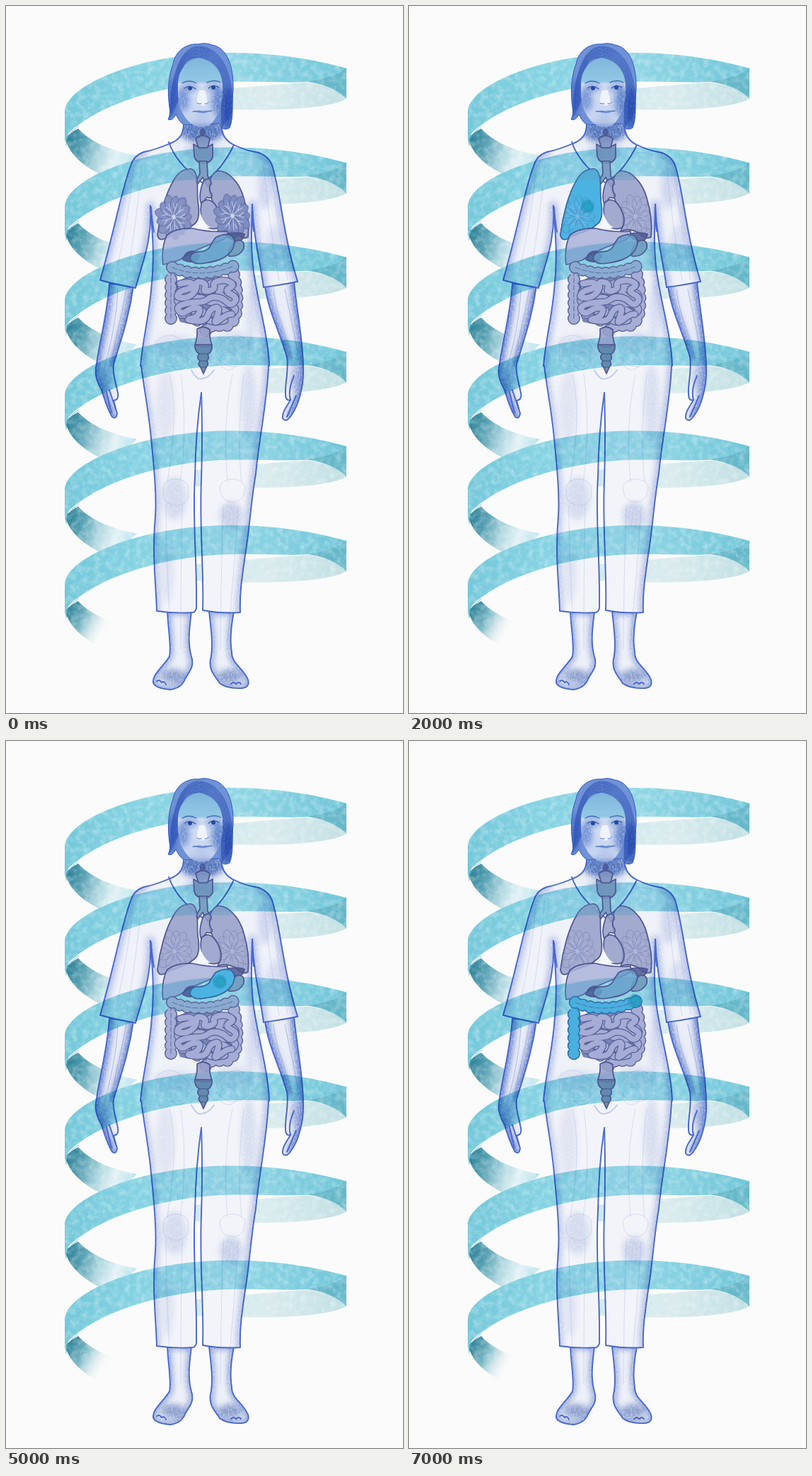
An HTML page that plays this animation: 561x998 px, repeating every 8 s.

```html
<!DOCTYPE html>
<html lang="en">
<head>
<meta charset="utf-8">
<title>Body and helix</title>
<style>
  html, body { margin: 0; height: 100%; overflow: hidden; background: #fbfbfb; }
  svg { display: block; width: 100vw; height: 100vh; }
  path, ellipse { stroke-linecap: round; stroke-linejoin: round; }
  .ink { fill: none; stroke: #4a69d3; stroke-width: 1.9; }
  .thin { fill: none; stroke: #7f98dc; stroke-width: .8; opacity: .32; }
  .organ { fill: #949cc8; fill-opacity: .84; stroke: #4d5690; stroke-width: 1.7; }
  .lit { fill: #4bb3e2; stroke: #2f689f; stroke-width: 1.4; }
  .multiply { mix-blend-mode: multiply; }
</style>
</head>
<body>
<svg id="stage" viewBox="0 0 561 998" preserveAspectRatio="none">
  <defs>
    <linearGradient id="front" gradientUnits="userSpaceOnUse" x1="83" x2="481" y1="0" y2="0">
      <stop offset="0" stop-color="#74c8da"/><stop offset=".25" stop-color="#83d2e2"/>
      <stop offset=".6" stop-color="#90d6e5"/><stop offset="1" stop-color="#70c6d9"/>
    </linearGradient>
    <linearGradient id="inside" gradientUnits="userSpaceOnUse" x1="86" x2="182" y1="190" y2="222">
      <stop offset="0" stop-color="#2f8299"/><stop offset=".2" stop-color="#519db0"/>
      <stop offset=".5" stop-color="#b3d9e1"/><stop offset=".72" stop-color="#e3f2f6"/>
      <stop offset="1" stop-color="#b5e2ec"/>
    </linearGradient>
    <linearGradient id="insideEnd" gradientUnits="userSpaceOnUse" x1="86" x2="140" y1="190" y2="220">
      <stop offset="0" stop-color="#2f8299"/><stop offset=".4" stop-color="#7db9c6"/>
      <stop offset="1" stop-color="#fbfbfb" stop-opacity="0"/>
    </linearGradient>
    <linearGradient id="back" gradientUnits="userSpaceOnUse" x1="260" x2="481" y1="0" y2="0">
      <stop offset="0" stop-color="#cfe8ee"/><stop offset=".5" stop-color="#d9ebed"/>
      <stop offset="1" stop-color="#c0dfe3"/>
    </linearGradient>
    <linearGradient id="skin" gradientUnits="userSpaceOnUse" x1="0" x2="0" y1="74" y2="172">
      <stop offset="0" stop-color="#7fb6dc"/><stop offset=".33" stop-color="#93c8e4"/>
      <stop offset=".37" stop-color="#d5e0f4"/><stop offset="1" stop-color="#c3d1ef"/>
    </linearGradient>
    <filter id="paper" color-interpolation-filters="sRGB">
      <feTurbulence type="fractalNoise" baseFrequency=".12" numOctaves="4" seed="4"/>
      <feColorMatrix values="0 0 0 0 1  0 0 0 0 1  0 0 0 0 1  0 0 0 .7 -.27"/>
      <feComposite operator="in" in2="SourceGraphic" result="n"/>
      <feMerge><feMergeNode in="SourceGraphic"/><feMergeNode in="n"/></feMerge>
    </filter>
    <filter id="pencil" x="-50%" y="-50%" width="200%" height="200%" color-interpolation-filters="sRGB">
      <feGaussianBlur stdDeviation="4.5" result="b"/>
      <feTurbulence type="fractalNoise" baseFrequency=".5 .3" numOctaves="2" seed="9"/>
      <feColorMatrix values="0 0 0 0 0  0 0 0 0 0  0 0 0 0 0  0 0 0 1.3 .25" result="n"/>
      <feComposite in="b" in2="n" operator="in"/>
    </filter>
  </defs>
</svg>
<script>
const stage = document.getElementById('stage');
let clips = 0;

const path = (d, attrs = '') => `<path d="${d}" ${attrs}/>`;
const group = (attrs, ...items) => `<g ${attrs}>${items.join('')}</g>`;
const ink = (d, attrs = '') => path(d, `class="ink" ${attrs}`);
const organ = (d, fill) => path(d, `class="organ" ${fill ? `style="fill:${fill}"` : ''}`);
const clipped = (d, ...items) => {
  const id = 'c' + clips++;
  return `<clipPath id="${id}">${path(d)}</clipPath>` + group(`clip-path="url(#${id})"`, ...items);
};
const smudge = (x, y, rx, ry, color, opacity) =>
  `<ellipse cx="${x}" cy="${y}" rx="${rx}" ry="${ry}" fill="${color}" opacity="${opacity}" filter="url(#pencil)"/>`;
const repeat = (n, make) => Array.from({ length: n }, (_, i) => make(i)).join('');

// Tinted shape with pencil shading along an edge, kept inside the shape.
const shaded = (d, tint, shade, width, opacity, edge = d) =>
  path(d, `fill="${tint}"`) +
  clipped(d, path(edge, `fill="none" stroke="${shade}" stroke-width="${width}" opacity="${opacity}" filter="url(#pencil)"`));

// Parts that show only during the given seconds of the loop.
const during = (seconds, ...items) => group(`data-on="${seconds}"`, ...items);
const lit = d => path(d, 'class="lit"');
const spot = (x, y, r) =>
  `<circle cx="${x}" cy="${y}" r="${r}" fill="#168fb4" opacity=".45"/>` +
  `<circle cx="${x + 1}" cy="${y}" r="${r * .62}" fill="#25a3c1" stroke="#147fa9" stroke-width=".7" opacity=".7"/>`;

function smooth(p) {
  let d = `M${p[0]},${p[1]}`;
  for (let i = 2; i < p.length - 2; i += 2)
    d += ` Q${p[i]},${p[i + 1]} ${(p[i] + p[i + 2]) / 2},${(p[i + 1] + p[i + 3]) / 2}`;
  return d;
}

const body = {
  armL: 'M146,392 C144,430 132,475 128,505 C124,522 130,532 135,542 C139,555 145,572 150,580 Q156,584 157,575 L152,557 Q160,556 158,546 C155,530 150,519 152,506 C162,472 174,440 180,395Z',
  armR: 'M366,395 C370,430 388,462 397,496 C400,515 394,532 395,548 Q395,558 402,556 C397,565 390,573 391,582 Q396,589 403,578 C413,565 421,538 420,510 C420,475 411,430 407,390Z',
  footL: 'M228,854 C229,880 234,904 231,918 C225,930 207,942 208,955 Q210,963 232,965 Q248,963 253,950 C258,940 265,936 263,922 C256,900 259,880 262,855Z',
  footR: 'M287,855 C290,880 293,905 289,922 C286,938 296,946 302,956 Q312,964 333,963 Q345,962 342,951 C336,935 318,928 319,912 C316,895 318,875 322,855Z',
  neck: 'M250,155 C251,183 247,190 232,194 L278,250 L322,196 Q306,192 304,155Z',
  shirt: 'M232,194 Q211,203 195,206 Q180,211 176,226 C163,260 152,322 133,387 Q155,393 183,398 C193,362 207,330 205,282 C206,315 211,350 205,402 C201,444 193,472 190,508 H372 C371,470 357,420 352,388 C345,350 347,315 348,280 C350,330 359,360 364,397 Q388,394 412,389 C391,320 388,265 377,228 Q373,213 357,207 Q338,204 322,196 L278,250Z',
  legL: 'M191,508 C195,540 202,575 205,610 C209,650 213,690 211,720 C206,775 212,815 213,854 Q240,858 265,856 Q270,853 269,845 C270,780 263,720 267,665 Q268,600 276,546 L277,508Z',
  legR: 'M371,508 C369,560 357,615 353,660 C346,700 344,740 338,775 C333,810 330,830 331,856 Q305,858 278,853 C280,800 273,735 276,670 Q278,600 276,546 L277,508Z'
};

const turns = draw => group('filter="url(#paper)"',
  repeat(6, i => group(`transform="translate(0 ${i * 133.4})"`, draw(i))));

const helixBack = () => turns(i =>
  path('M262,122 Q380,110 428,108 Q464,114 481,126 V131 C455,145 385,150 262,144Z', 'fill="url(#back)"') +
  path('M102,173 C119,192 150,205 185,211 L150,245 C116,232 88,211 84,186 Q92,178 102,173Z',
    `fill="url(#${i < 5 ? 'inside' : 'insideEnd'})"`));

const helixFront = () => turns(() =>
  path('M83,150 C83,112 190,66 318,66 C390,66 450,79 481,88 C470,98 450,104 428,107 C395,109 350,106 318,107 C220,109 130,140 90,178 Q84,185 85,197 L83,188Z', 'fill="url(#front)"') +
  path('M481,88 C470,98 450,104 428,107 Q464,113 481,131Z', 'fill="#65b8c9"') +
  path('M481,88 C470,98 450,104 428,107 M102,170 Q84,182 85,197', 'fill="none" stroke="#4aa6ba" stroke-width=".7"'));

function limbs() {
  const arm = (d, edge) => shaded(d, '#eef1fb', '#3f62c6', 11, .85, edge) + ink(d, 'stroke-width=".9"');
  const foot = d => shaded(d, '#f1f4fc', '#5474c6', 8, .7) + ink(d, 'stroke-width=".9"');
  return [
    arm(body.armL, 'M146,392 C144,430 132,475 128,505 C124,522 130,532 135,542 L150,580 M180,395 C174,440 162,472 152,506'),
    arm(body.armR, 'M407,390 C411,430 420,475 420,510 C421,538 413,565 403,578 M366,395 C370,430 388,462 397,496'),
    foot(body.footL), foot(body.footR),
    smudge(141, 525, 7, 18, '#4569c8', .5), smudge(409, 525, 7, 20, '#4569c8', .4),
    smudge(236, 946, 17, 10, '#4867b5', .6), smudge(317, 946, 17, 10, '#4867b5', .6),
    ink('M142,545 L149,574 M146,542 L155,569 M407,522 Q398,542 402,556 M410,550 L397,580', 'stroke-width=".6"'),
    ink('M213,953 q4,-3 7,2 q4,-3 6,3 M318,957 q4,-4 7,0 q5,-4 7,0', 'stroke-width=".6"'),
    path('M158,400 C157,440 147,480 139,510 M170,400 C163,440 153,475 148,508 M378,400 C382,440 400,470 404,500 M394,400 C401,435 409,465 413,500 L402,495', 'class="thin" style="opacity:.7"')
  ].join('');
}

function clothes() {
  const sides = 'M204,282 C206,315 211,350 205,402 C201,444 193,472 190,508 M348,280 C347,315 345,350 352,388 C357,420 371,470 372,508';
  const sleeves = 'M195,206 Q180,211 176,226 C163,260 152,322 133,387 M183,398 C193,362 207,330 204,282 M357,207 Q373,213 377,228 C388,265 391,320 412,389 M364,397 C359,360 350,330 348,280';
  const hems = 'M232,194 Q211,203 195,206 M133,387 Q155,393 183,398 M322,196 Q338,204 357,207 M364,397 Q388,394 412,389';
  const outerL = 'M191,508 C195,540 202,575 205,610 C209,650 213,690 211,720 C206,775 212,815 213,854';
  const outerR = 'M371,508 C369,560 357,615 353,660 C346,700 344,740 338,775 C333,810 330,830 331,856';
  const bones = [
    'M231,520 C242,570 236,620 228,672 M247,520 C254,570 253,630 246,672 M320,520 C309,570 309,620 313,672 M336,520 C329,580 328,625 333,672',
    'M223,685 a18,15 0 1 0 34,0 a18,13 0 1 0 -34,0 M303,685 a17,15 0 1 0 34,0 a18,13 0 1 0 -34,0',
    'M226,706 Q226,780 234,908 M249,706 Q247,790 247,908 M307,706 Q304,790 303,908 M328,706 Q323,790 312,908',
    'M213,474 C230,455 252,468 264,492 C246,515 230,512 213,500Z M343,474 C326,455 306,468 295,492 C312,515 328,512 343,500Z',
    'M232,501 a12,12 0 1 0 25,0 a12,12 0 1 0 -25,0 M302,501 a12,12 0 1 0 25,0 a12,12 0 1 0 -25,0',
    'M180,225 Q174,300 154,382 M192,224 Q184,310 170,388 M364,225 Q372,310 386,388 M375,240 Q385,315 398,386',
    'M240,209 Q222,203 196,216 M315,209 Q335,202 360,216'
  ];
  return [
    path(body.neck, 'fill="#eef2fb"'),
    clipped(body.neck, smudge(277, 176, 32, 17, '#3a62b6', .85), smudge(277, 205, 24, 10, '#7d9bd6', .4)),
    shaded(body.legL, '#f7f8fd', '#7d93d8', 9, .55, outerL),
    shaded(body.legR, '#f7f8fd', '#7d93d8', 11, .6, outerR),
    shaded(body.shirt, '#f4f6fd', '#7b92da', 11, .6, sleeves + sides),
    smudge(366, 255, 10, 32, '#8fa1da', .35), smudge(380, 340, 13, 30, '#9aaae0', .28),
    smudge(240, 480, 33, 16, '#a9b5de', .28), smudge(322, 474, 28, 16, '#a9b5de', .28),
    smudge(347, 430, 8, 40, '#99aade', .28), smudge(225, 565, 13, 50, '#a9b6e2', .25),
    smudge(343, 560, 11, 55, '#9baddf', .3), smudge(238, 695, 17, 30, '#8fa2d8', .3),
    smudge(318, 720, 16, 20, '#8399d4', .38), smudge(228, 800, 9, 42, '#a3b1df', .25),
    ...bones.map(d => path(d, 'class="thin"')),
    ink(sleeves), ink(sides), ink(hems),
    ink('M205,284 Q206,300 209,319 M348,280 Q347,298 350,318', 'stroke-width="2.8"'),
    ink('M230,192 Q240,222 278,250 Q305,232 322,196 M251,168 Q251,187 232,194 M304,172 Q307,189 322,196', 'stroke-width="1.2"'),
    ink(outerL + ' Q240,858 265,856 Q270,853 269,845 C270,780 263,720 267,665 Q268,600 276,546'),
    ink(outerR + ' Q305,858 278,853 C280,800 273,735 276,670 Q278,600 276,546'),
    ink('M262,514 Q270,529 277,526 Q285,526 294,514', 'stroke-width=".8" opacity=".3"')
  ].join('');
}

function head() {
  const hair = 'M272,54 C256,52 239,63 236,82 C229,100 228,122 231,143 Q233,153 229,160 Q235,163 240,153 Q246,166 253,168 L301,166 Q306,178 316,172 C322,158 319,137 321,118 C322,87 313,58 291,55 Q281,51 272,54Z';
  const face = 'M271,73 C254,77 243,92 243,111 C242,135 247,152 258,163 Q275,178 291,165 C303,151 307,131 306,111 C305,92 294,76 271,73Z';
  const strands = repeat(14, i => path(
    `M272,${57 + i * 1.3} C${250 - i * .4},${57 + i} ${233 + i},${88 + i} ${231 + i},${159 - i * 2} ` +
    `M273,${57 + i * 1.2} C${303 - i},${58 + i} ${322 - i},${92 + i} ${320 - i * 1.25},${150 + i * 1.8}`));
  return [
    path(hair, 'fill="#6f92d6"'),
    clipped(hair, group('fill="none" stroke="#2a4db2" stroke-width="1" opacity=".65"', strands),
      smudge(314, 145, 8, 30, '#1f41aa', .8), smudge(235, 130, 5, 28, '#2449b5', .65)),
    ink(hair, 'style="stroke:#3457be;stroke-width:1"'),
    path(face, 'fill="url(#skin)"'),
    clipped(face,
      smudge(250, 132, 9, 17, '#4a72c8', .7), smudge(301, 135, 10, 21, '#3a66c0', .75),
      smudge(275, 173, 22, 7, '#496fc0', .6), smudge(260, 115, 11, 5, '#3f68ba', .65), smudge(293, 115, 11, 5, '#3f68ba', .6),
      smudge(277, 156, 10, 3, '#6b88cf', .4)),
    path('M273,119 Q269,132 270,138 Q277,143 285,138 Q284,130 281,119Z', 'fill="#f5f7fd" opacity=".85"'),
    group('fill="none" stroke="#2d4fa8" stroke-width="1.1"',
      path('M249,109 Q258,103 269,109 M284,108 Q295,103 303,108', 'stroke-width="1.4" opacity=".75"'),
      path('M252,116 Q260,111 268,117 M286,116 Q293,110 301,115'),
      path('M270,137 q3,2 6,1 M281,138 q3,1 5,-2', 'stroke-width=".8"'),
      path('M264,149 Q274,148 278,150 Q284,148 291,148')),
    '<g fill="#2449a4"><circle cx="260" cy="116" r="3"/><circle cx="293" cy="115" r="3"/></g>',
    path('M266,149 Q272,146 277,148 Q283,146 289,149 Q278,154 266,149Z', 'fill="#698bce" opacity=".6"')
  ].join('');
}

// Fan of lobes with pale ducts.
function breast(x, y, fill, duct = '#d3dbf2') {
  const lobes = repeat(13, i => `<ellipse cx="17" rx="13" ry="7" transform="rotate(${i * 27.7}) scale(${i % 2 ? .96 : .87} 1)"/>`);
  const ducts = repeat(9, i => path('M0,0 Q8,-1 18,2 M10,0 L17,-4', `transform="rotate(${i * 40})"`));
  return group(`transform="translate(${x} ${y}) scale(.94 1.12)"`,
    group(`fill="${fill}" stroke="#5565a2" stroke-width=".8"`, lobes),
    group(`fill="none" stroke="${duct}" stroke-width=".9"`, ducts));
}

// Rounded dashes read as the pouches of the colon.
function pouches(d, fill, edge = '#566096') {
  const dots = (color, w) => path(d, `fill="none" stroke="${color}" stroke-width="${w}" stroke-dasharray="0 11"`);
  return dots(edge, 18) + dots(fill, 15.2) + path(d, `fill="none" stroke="${fill}" stroke-width="9"`);
}

function chest() {
  const lungL = 'M259,230 Q245,231 237,246 C225,265 217,298 214,323 Q216,333 225,328 C235,320 250,322 267,307 Q274,301 272,282 C269,264 272,252 269,240 Q266,229 259,230Z';
  const lungR = 'M299,233 C314,232 330,249 336,271 C341,288 344,309 342,326 Q335,331 324,320 Q311,313 299,318 C306,303 302,287 292,276 Q284,255 289,245 Q292,235 299,233Z';
  const overBand = '<rect x="210" y="226" width="140" height="20" fill="#5f9dc2" opacity=".4"/>';
  const leaf = breast(238, 297, 'none', '#c4cfec') + breast(320, 297, 'none', '#c4cfec');
  return [
    organ('M278,173 Q285,180 278,181 Q272,181 278,173Z', '#475f9c'),
    organ('M268,187 Q278,179 288,187 L285,201 L272,201Z', '#7b93bf'),
    organ('M265,195 L273,200 H283 L292,195 V214 Q288,222 279,222 Q268,221 266,212Z', '#6c8fb8'),
    organ('M273,219 H284 L285,240 L291,252 L285,255 L278,242 L271,251 L268,247 L274,237Z', '#7797be'),
    organ(lungL), organ(lungR),
    clipped(lungL + lungR, overBand),
    during('2', lit(lungL), clipped(lungL, overBand)),
    clipped(lungL + lungR, group('opacity=".42"', leaf)),
    during('2', spot(252, 283, 10)),
    organ('M279,247 Q288,240 290,249 Q285,259 291,266 Q292,273 284,270 L276,280 Q271,268 279,247Z'),
    organ('M276,278 Q286,268 296,281 Q308,298 302,312 Q291,319 280,308 Q273,296 276,278Z'),
    path('M274,288 Q277,303 270,313 H290 Q278,308 274,288Z', 'fill="#f6f7fd"'),
    during('0 1', breast(237, 298, '#8792c3')),
    during('0', breast(320, 296, '#808dc0')),
    during('1', breast(320, 296, '#4bb3e2', '#9bdbef'), spot(319, 292, 9))
  ].join('');
}

function belly() {
  const liver = 'M222,365 Q219,342 227,324 Q239,313 264,314 Q289,320 313,318 Q315,328 301,332 C279,340 260,347 246,358 Q233,363 222,365Z';
  const liverBand = path('M210,348 Q255,334 330,332 V370 H210Z', 'fill="#5f9dcb" opacity=".5"');
  const stomach = 'M296,327 Q308,320 318,324 Q327,331 319,345 C310,358 294,361 281,363 Q265,366 260,357 Q261,346 274,347 Q287,346 290,336Z';
  const pancreas = 'M250,358 C252,345 263,345 272,350 C291,350 308,340 326,331 Q339,328 336,342 C316,354 291,362 270,361 Q255,371 250,358Z';
  const gut = smooth([246, 392, 262, 388, 264, 398, 246, 402, 240, 412, 258, 412, 270, 400, 268, 388, 284, 392, 278, 404, 296, 400, 292, 390, 310, 386, 324, 394, 308, 402, 328, 412, 318, 424, 306, 412, 290, 410, 280, 418, 262, 418, 240, 424, 248, 436, 262, 426, 276, 426, 270, 440, 252, 443, 282, 446, 288, 428, 302, 424, 298, 440, 294, 449, 314, 434, 324, 436]);
  const ascending = 'M233,441 V376', across = 'M235,369 Q276,386 322,367';
  const descending = 'M322,379 Q328,405 326,426 Q324,452 306,452 Q287,447 280,462';
  const tube = (fill, edge) => group(`fill="none" stroke="${edge}" stroke-width="10.5"`, path(gut)) +
    group(`fill="none" stroke="${fill}" stroke-width="8"`, path(gut));
  // A mirrored copy underneath packs the gaps between the loops.
  const coils = (fill, edge) => group('transform="translate(567 1) scale(-1 1)"', tube(fill, edge)) + tube(fill, edge);
  const band = d => path(d, 'fill="none" stroke="#5b6ca8" stroke-width="1" stroke-dasharray="7 3"');
  return [
    organ('M309,322 Q326,318 337,322 Q336,332 326,332 Q316,330 309,322Z', '#4a568f'),
    organ('M326,331 Q338,329 336,342 Q330,355 315,353 Q311,345 326,331Z', '#6e97b7'),
    organ(liver, '#aab2d9'),
    clipped(liver, liverBand),
    during('3', lit(liver), clipped(liver, liverBand), spot(241, 332, 8)),
    organ('M250,358 Q253,346 264,346 L273,353 Q265,366 250,358Z', '#405891'),
    organ(stomach, '#669fca'),
    during('5', lit(stomach), spot(302, 340, 10)),
    during('4', lit(pancreas), spot(267, 355, 6)),
    path('M240,388 Q280,379 323,385 Q331,417 321,443 Q290,456 246,446 Q235,421 240,388Z', 'fill="#7983b6"'),
    pouches(descending, '#a6add5'), pouches(ascending, '#a3add5'),
    coils('#a5acd5', '#566199'),
    during('6', coils('#5bbbe6', '#33659c'), spot(267, 411, 7)),
    pouches(across, '#8aabd1'),
    band(across), band(ascending),
    during('7', pouches(ascending, '#48b0df', '#2c6ea7'), pouches(across, '#48b0df', '#2c6ea7'), spot(319, 367, 10), band(across)),
    organ('M270,456 Q279,450 288,457 Q287,468 291,479 Q278,484 267,478 Q271,467 270,456Z'),
    organ('M267,478 H291 Q292,488 285,492 Q288,497 284,501 Q287,506 283,510 L279,519 L275,510 Q270,506 274,501 Q268,497 273,491 Q266,487 267,478Z', '#5a7ca4'),
    path('M273,491 H285 M274,501 H284 M275,510 H283', 'fill="none" stroke="#405486"')
  ].join('');
}

stage.innerHTML += helixBack() + path(Object.values(body).join(''), 'fill="#fbfbfb"') + helixFront() +
  group('class="multiply"', limbs(), clothes()) + head() + chest() + belly();

for (const el of stage.querySelectorAll('[data-on]')) {
  const on = el.dataset.on.split(' ').map(Number);
  const frames = Array.from({ length: 9 }, (_, i) =>
    ({ opacity: on.includes(i % 8) ? 1 : 0, offset: i / 8, easing: 'steps(1)' }));
  el.animate(frames, { duration: 8000, iterations: Infinity });
}
</script>
</body>
</html>
```
